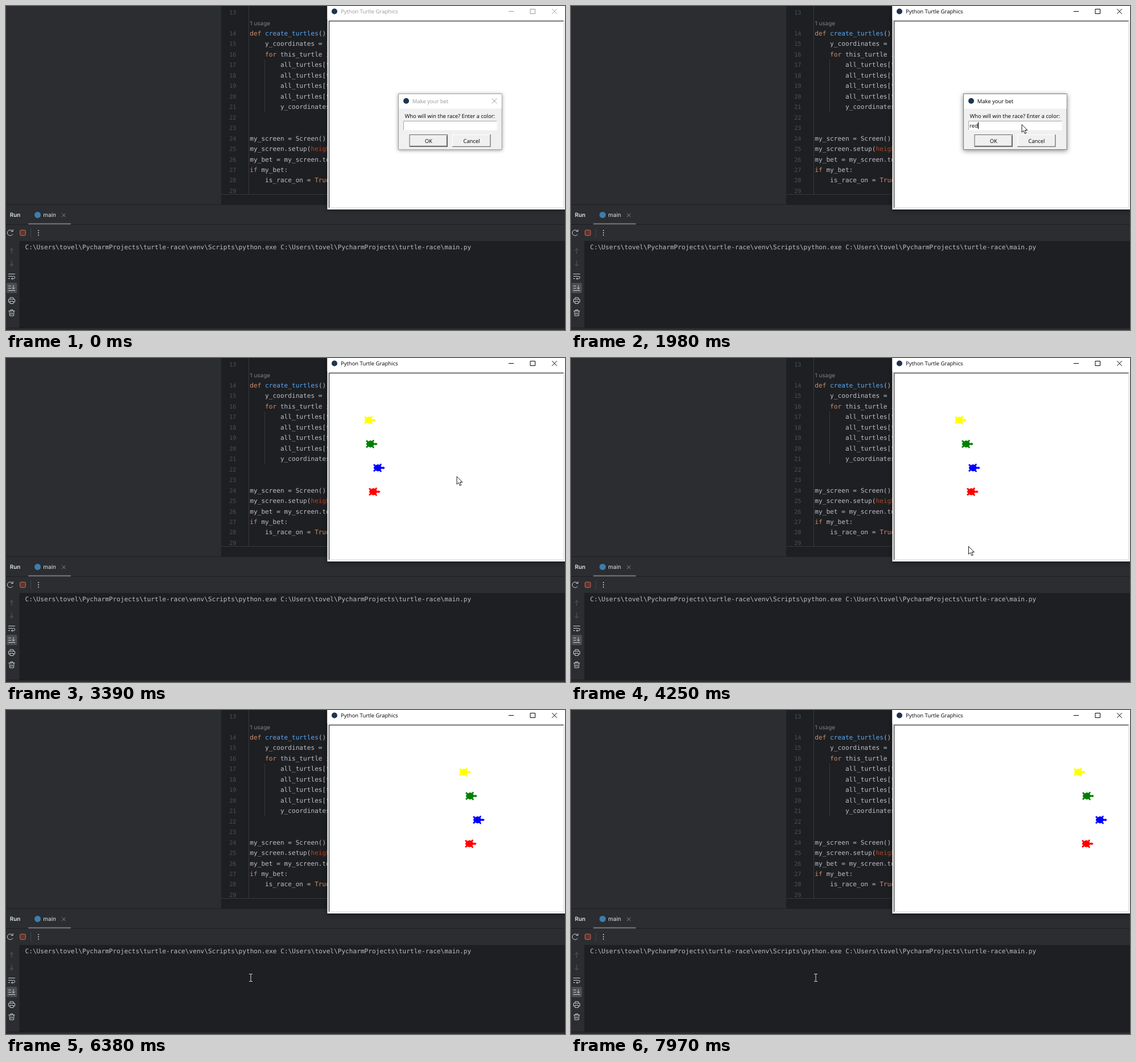
An HTML page for the animation above (7990 ms loop, 982 by 570 pixels).

```html
<!DOCTYPE html>
<html lang="en">
<head>
<meta charset="utf-8">
<title>Turtle race</title>
<style>
  html, body { margin: 0; width: 100%; height: 100%; overflow: hidden; background: #1e1f22; }
  svg { display: block; width: 982px; height: 570px; }
  text { white-space: pre; text-rendering: geometricPrecision; }
  .code { font: 11.13px "DejaVu Sans Mono", monospace; fill: #bcbec4; }
  .num { font: 10.2px "DejaVu Sans Mono", monospace; fill: #4b5059; text-anchor: end; }
  .ide { font: 10px Inter, sans-serif; fill: #dfe1e5; }
  .bold { font-weight: 600; }
  .win { font: 9.47px "Open Sans", sans-serif; fill: #000; }
  .mid { text-anchor: middle; }
  .kw { fill: #cf8e6d; }
  .fn { fill: #56a8f5; }
  .arg { fill: #aa4926; }
  .line { fill: none; stroke: #ced0d6; stroke-width: 1; }
  .dim { stroke: #5a5d63; }
  .frame { filter: drop-shadow(0 1px 3px rgba(0,0,0,.4)); }
  .active .frame { filter: drop-shadow(0 2px 4px rgba(0,0,0,.45)); }
  .caption { fill: #999; }
  .glyph { fill: none; stroke: #999; }
  .active .caption { fill: #000; }
  .active .glyph { stroke: #000; }
  #dialog { transform-origin: 780px 204px; }
  #dialog .edge { stroke: #a5a5a5; }
  #dialog.active .edge { stroke: #7a7a7a; }
  #dialog.active .glyph { stroke: none; }
</style>
</head>
<body>
<svg viewBox="0 0 982 570">
  <!-- editor -->
  <rect width="982" height="570" fill="#1e1f22"/>
  <rect width="378" height="349" fill="#2b2d30"/>
  <path d="M426.5 0V331M378 331.5H564M454.5 94V187" fill="none" stroke="#36383c"/>
  <g id="editor"></g>
  <text class="ide" x="428.5" y="33.5" fill-opacity=".5">1 usage</text>

  <!-- run panel -->
  <rect y="350" width="982" height="34" fill="#2b2d30"/>
  <rect y="385" width="982" height="28.5" fill="#2b2d30"/>
  <rect y="413" width="23.5" height="153" fill="#2b2d30"/>
  <rect y="567" width="982" height="3" fill="#2b2d30"/>
  <text class="ide bold" x="6.7" y="371.3">Run</text>
  <circle cx="55.5" cy="367.5" r="5.5" fill="#3f7cac"/>
  <text class="ide" x="65.3" y="371.3">main</text>
  <path class="line" style="stroke:#868a91" d="M98.5 365l6 6m0-6l-6 6"/>
  <rect x="39" y="382" width="75" height="2.6" rx="1.2" fill="#6a6d73"/>
  <path class="line" d="M11.5 396.2A5 5 0 1 0 11.7 401.5M12.3 393v3.6h-3.8"/>
  <rect x="24.7" y="394.2" width="9.6" height="9.6" rx="1.5" fill="#5a3533" stroke="#d66a58"/>
  <path d="M43.5 391V407" stroke="#43454a"/>
  <g fill="#ced0d6"><circle cx="57" cy="395" r="1"/><circle cx="57" cy="399" r="1"/><circle cx="57" cy="403" r="1"/></g>
  <rect x="1" y="487" width="18.3" height="18.3" rx="3" fill="#4a4d51"/>
  <path class="line dim" d="M10 436v-9.5m-3.5 3.5l3.5-3.5 3.5 3.5M10 448v9.5m-3.5-3.5l3.5 3.5 3.5-3.5"/>
  <path class="line" d="M4 471.5h12M4 475.5h9.5a2 2 0 0 1 0 4.2h-4m2-2l-2 2 2 2M4 479.5h3"/>
  <path class="line" d="M4 492.5h5M4 496.5h5M4 500.5h12M13 491v7m-2.5-2.5l2.5 2.5 2.5-2.5"/>
  <path class="line" d="M7 516v-3h6v3M7 521h-2.5v-5h11v5H13M7 519.5h6v4H7z"/>
  <path class="line" d="M4.5 536.5h11M8 536v-1.5h4v1.5M6 537l.5 8h7l.5-8M8.7 539v4M11.3 539v4"/>
  <text class="code" x="33.5" y="427.5">C:\Users\tovel\PycharmProjects\turtle-race\venv\Scripts\python.exe C:\Users\tovel\PycharmProjects\turtle-race\main.py</text>

  <!-- turtle window -->
  <g id="main">
    <rect class="frame" x="564.4" y="-2" width="419" height="360" fill="#f0f0f0"/>
    <rect x="564.4" width="418" height="24" fill="#fff"/>
    <circle cx="577" cy="9.5" r="5" fill="#1d3550"/>
    <text class="win caption" x="588" y="13.3">Python Turtle Graphics</text>
    <path class="glyph" d="M883 9.5h9M921 5.5h8.5v8h-8.5zM959.3 5.3l8.5 8.5m0-8.5l-8.5 8.5"/>
    <rect x="567" y="25.5" width="413" height="330" fill="#fff"/>
    <path d="M567.6 355V26.5H979.5" fill="none" stroke="#505050" stroke-width="1.5"/>
    <path d="M979.5 27V354.5H568" fill="none" stroke="#e3e3e3"/>
    <g id="turtles"></g>
  </g>

  <!-- bet dialog -->
  <g id="dialog">
    <rect class="frame edge" x="689.5" y="154.5" width="181.5" height="98" fill="#f0f0f0"/>
    <rect x="690" y="155" width="180.5" height="25.5" fill="#fff"/>
    <circle cx="703" cy="167" r="5" fill="#1d3550"/>
    <text class="win caption" x="713.7" y="171">Make your bet</text>
    <path class="glyph" d="M853.6 162.7l8.6 8.6m0-8.6l-8.6 8.6"/>
    <text class="win" x="700.5" y="197">Who will win the race? Enter a color:</text>
    <rect x="698" y="202" width="164.5" height="16.5" fill="#fff"/>
    <path d="M698.5 218V202.5H862" fill="none" stroke="#a6a6a6"/>
    <text class="win" id="entry" x="700" y="213.5"></text>
    <rect id="caret" y="204.5" width="1.3" height="11.5"/>
    <rect x="709" y="226.5" width="66.5" height="21" fill="#f0f0f0" stroke="#646464"/>
    <path d="M774.3 228V246.5H710" fill="none" stroke="#777" stroke-width="1.3"/>
    <text class="win mid" x="742.3" y="240.5">OK</text>
    <path d="M784.5 247.5V226.5H851" fill="none" stroke="#fff"/>
    <path d="M850.8 226V247.3H784" fill="none" stroke="#6e6e6e" stroke-width="1.3"/>
    <text class="win mid" x="817.8" y="240.5">Cancel</text>
  </g>

  <path id="arrow" d="M0 0V13.7L3.2 10.8 5.4 16 7.7 15 5.5 10H9.8z" fill="#fff" stroke="#000" stroke-width=".9"/>
  <path id="beam" d="M-3 -6.5H-.8L0 -6 .8 -6.5H3M0 -6V6M-3 6.5H-.8L0 6 .8 6.5H3" fill="none" stroke="#dcdcdc"/>
</svg>
<script>
const LOOP = 7990;
const $ = id => document.getElementById(id);

// Code rows: [line number, indent, markup]
const kw = s => `<tspan class="kw">${s}</tspan>`;
const rows = [
  [14, 0, kw('def') + ' <tspan class="fn">create_turtles</tspan>():'],
  [15, 4, 'y_coordinates = ['],
  [16, 4, kw('for') + ' this_turtle ' + kw('in')],
  ...[17, 18, 19, 20].map(n => [n, 8, 'all_turtles[this']),
  [21, 8, 'y_coordinates'],
  [24, 0, 'my_screen = Screen()'],
  [25, 0, 'my_screen.setup(<tspan class="arg">height</tspan>'],
  [26, 0, 'my_bet = my_screen.textinput('],
  [27, 0, kw('if') + ' my_bet:'],
  [28, 4, 'is_race_on = ' + kw('True')],
];
const rowY = n => n < 14 ? 15.3 : 52 + (n - 14) * 18.46;
let html = rows.map(([n, indent, s]) =>
  `<text class="code" x="${428.3 + indent * 6.7}" y="${rowY(n)}">${s}</text>`).join('');
for (let n = 13; n < 30; n++) html += `<text class="num" x="404.5" y="${rowY(n)}">${n}</text>`;
$('editor').innerHTML = html;

// Turtle outline: one half, mirrored about its axis
const half = [[16, 0], [14, -2], [10, -1], [7, -4], [9, -7], [8, -9], [5, -6],
  [1, -7], [-3, -5], [-6, -8], [-8, -6], [-5, -4], [-7, 0]];
const shell = [...half, ...half.slice(1, -1).reverse().map(([x, y]) => [x, -y])]
  .map(([x, y]) => [x * .82, y * .82]).join(' ');

// Left edge of each turtle at the race times
const raceTimes = [2390, 3390, 4250, 5070, 6020, 6380, 6820, 7630, 7970];
const racers = [
  ['#ffff00', 577, 629, 674, 717, 761, 796, 820, 864, 883],
  ['#008000', 577, 632, 686, 741, 786, 807, 832, 878, 898],
  ['#0000ff', 577, 645, 698, 738, 791, 820, 843, 893, 921],
  ['#ff0000', 577, 637, 695, 745, 788, 806, 831, 877, 897],
].map(([color, ...xs], i) => {
  const el = document.createElementNS('http://www.w3.org/2000/svg', 'polygon');
  el.setAttribute('points', shell);
  el.setAttribute('fill', color);
  el.setAttribute('stroke', color);
  $('turtles').append(el);
  return { el, xs, y: 109.3 + i * 42, phase: .1 + i * .2, shown: 2170 + i * 50 };
});

const pointer = [
  [20, 946, 553], [760, 792, 208.5], [3900, 792, 208.5], [4250, 698.5, 331.5],
  [4290, 694, 341], [4390, 694, 341], [4950, 439.5, 433.5], [5250, 439.5, 433.5], [5650, 430, 471],
];
const holds = [[4290, 4390], [5130, 5230]];
const typing = [[1270, 'r'], [1410, 're'], [1640, 'red']];

const clamp = v => Math.max(0, Math.min(1, v));
const ease = p => p * p * (3 - 2 * p);
const show = (el, on) => el.style.display = on ? '' : 'none';
const move = (el, x, y) => el.setAttribute('transform', `translate(${x} ${y})`);

function segment(times, t) {
  let i = 0;
  while (i < times.length - 2 && t >= times[i + 1]) i++;
  return [i, clamp((t - times[i]) / (times[i + 1] - times[i]))];
}

// Turtles take turns, each hopping about every 72 ms
function drawRace(t) {
  const [i, p] = segment(raceTimes, t);
  const hops = Math.round((raceTimes[i + 1] - raceTimes[i]) / 72);
  for (const { el, xs, y, phase, shown } of racers) {
    const q = Math.min(1, Math.floor(p * hops + phase) / hops);
    show(el, t >= shown);
    move(el, xs[i] + (xs[i + 1] - xs[i]) * q + 7, y);
  }
}

function drawDialog(t) {
  const gone = clamp((t - 2000) / 150);
  const dialog = $('dialog');
  show(dialog, gone < 1);
  dialog.setAttribute('class', t >= 860 ? 'active' : '');
  dialog.style.opacity = 1 - gone;
  dialog.style.transform = `scale(${1 - .08 * gone})`;
  const typed = typing.filter(([at]) => t >= at).pop();
  const entry = $('entry');
  entry.textContent = typed ? typed[1] : '';
  show($('caret'), t >= 870);
  if (gone < 1) $('caret').setAttribute('x', 700 + (typed ? entry.getComputedTextLength() : 0));
}

function drawPointer(t) {
  const [i, p] = segment(pointer.map(k => k[0]), t);
  const [, x0, y0] = pointer[i], [, x1, y1] = pointer[i + 1];
  const e = ease(p), x = x0 + (x1 - x0) * e, y = y0 + (y1 - y0) * e;
  const inConsole = y > 414;
  show($('arrow'), t >= 20 && !inConsole);
  show($('beam'), t >= 20 && inConsole);
  move($('arrow'), x, y);
  move($('beam'), x, y);
}

function draw(t) {
  const hold = holds.find(([a, b]) => t >= a && t < b);
  if (hold) t = hold[0];
  $('main').setAttribute('class', t >= 1910 ? 'active' : '');
  drawDialog(t);
  drawRace(t);
  drawPointer(t);
}

const start = performance.now();
function tick() {
  draw((performance.now() - start) % LOOP);
  requestAnimationFrame(tick);
}
tick();
</script>
</body>
</html>
```
